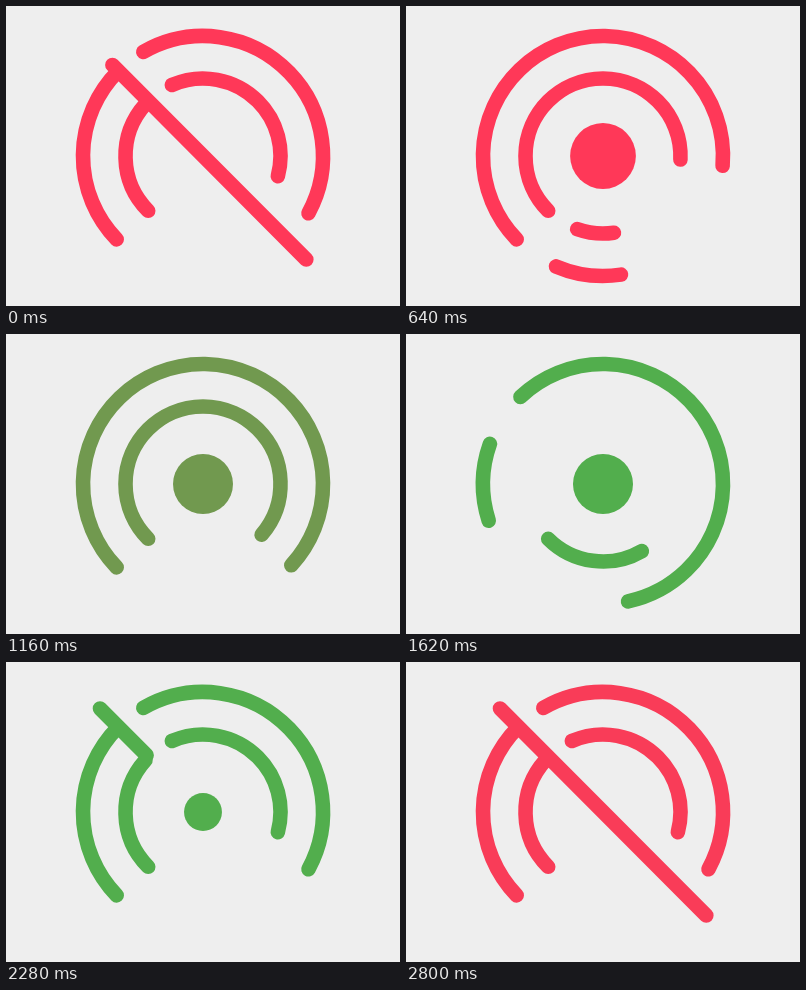
Recreate the animation shown at these times as an HTML page. Size 394 by 300 pixels, loop 3.94 s.

```html
<!DOCTYPE html>
<html lang="en">
<head>
<meta charset="utf-8">
<title>Signal toggle</title>
<style>
  html, body { margin: 0; width: 100%; height: 100%; overflow: hidden; background: #eee; }
  svg { display: block; width: 100%; height: 100%; }
</style>
</head>
<body>
<svg viewBox="0 0 394 300">
  <g id="icon">
    <g fill="none" stroke-width="14.6" stroke-linecap="round">
      <circle id="outer" cx="197" cy="150" r="120" pathLength="360" transform="rotate(136 197 150)"/>
      <circle id="inner" cx="197" cy="150" r="77.5" pathLength="360" transform="rotate(135 197 150)"/>
      <path id="slash"/>
    </g>
    <circle id="dot" cx="197" cy="150" stroke="none"/>
  </g>
</svg>
<script>
const LOOP = 3940, TURN_ON = 180, TURN_OFF = 1460, SPAN = 800;
const RED = [255, 56, 88], GREEN = [82, 174, 77];
const $ = id => document.getElementById(id);

// Dash lengths in degrees: the lone arc when on; first arc, gap and second arc when off.
const OUTER = { on: 266.6, first: 89, gap: 15.2, second: 148.3 };
const INNER = { on: 265.8, first: 87, gap: 24.3, second: 128.7 };

const ramp = (t, from, span) => Math.min(1, Math.max(0, (t - from) / span));
const sineOut = x => Math.sin(x * Math.PI / 2);
const inOut = x => x < .5 ? 2 * x * x : 1 - 2 * (1 - x) ** 2;
const out = (x, n) => 1 - (1 - x) ** n;
const backIn = x => 2.70158 * x ** 3 - 1.70158 * x * x;
const mix = (a, b, k) => a + (b - a) * k;

function dash(id, first, gap, second, period, shift) {
  const rest = Math.max(0, period - first - gap - second);
  $(id).setAttribute('stroke-dasharray', [first, gap, second, rest].join(' '));
  $(id).setAttribute('stroke-dashoffset', -shift);
}

// The first arc grows while the second shrinks away towards the seam.
function merge(id, ring, p) {
  dash(id, mix(ring.first, ring.on, p), mix(ring.gap, 360 - ring.on, p),
    mix(ring.second, 0, p), 360, 0);
}

// One full turn at a steady pace while the arc splits in two.
function splitOuter(p, turn) {
  const { on, first, gap, second } = OUTER;
  const a = mix(on, first, p), b = second * turn;
  const tail = (360 - first - gap - second) * turn;
  dash('outer', a, 360 - a - b - tail, b, 360, 360 * turn);
}

// The arc rushes out past the seam and the pair follows it in.
function splitInner(p) {
  const { on, first, gap, second } = INNER;
  dash('inner', mix(on, first, p), gap * p, second * p, 360 * (2 - p), 360 * p ** .2);
}

function slashPath(from, to) {
  if (to - from < .001) return '';
  const at = k => mix(94, 300.3, k) + ' ' + mix(46.5, 253.5, k);
  return `M${at(from)}L${at(to)}`;
}

function draw(t) {
  let line, size, green;
  if (t < TURN_OFF) {
    const p = sineOut(ramp(t, TURN_ON, SPAN));
    merge('outer', OUTER, p);
    merge('inner', INNER, p);
    line = slashPath(out(ramp(t, -10, 360), 2), 1);
    size = 1 - backIn(1 - ramp(t, 160, 900));
    green = out(ramp(t, 1100, 140), 3);
  } else {
    const p = sineOut(ramp(t, TURN_OFF, SPAN));
    splitOuter(p, ramp(t, TURN_OFF, SPAN * .8));
    splitInner(p);
    line = slashPath(0, inOut(ramp(t, 2160, 360)));
    size = 1 - backIn(ramp(t, 1610, 810));
    green = 1 - .965 * out(ramp(t, 2530, 270), 2);
  }
  $('slash').setAttribute('d', line);
  $('dot').setAttribute('r', Math.max(0, 30 * size));

  const color = `rgb(${RED.map((c, i) => Math.round(mix(c, GREEN[i], green)))})`;
  $('icon').setAttribute('fill', color);
  $('icon').setAttribute('stroke', color);
}

const start = performance.now();
function tick() {
  draw((performance.now() - start) % LOOP);
  requestAnimationFrame(tick);
}
tick();
</script>
</body>
</html>
```
